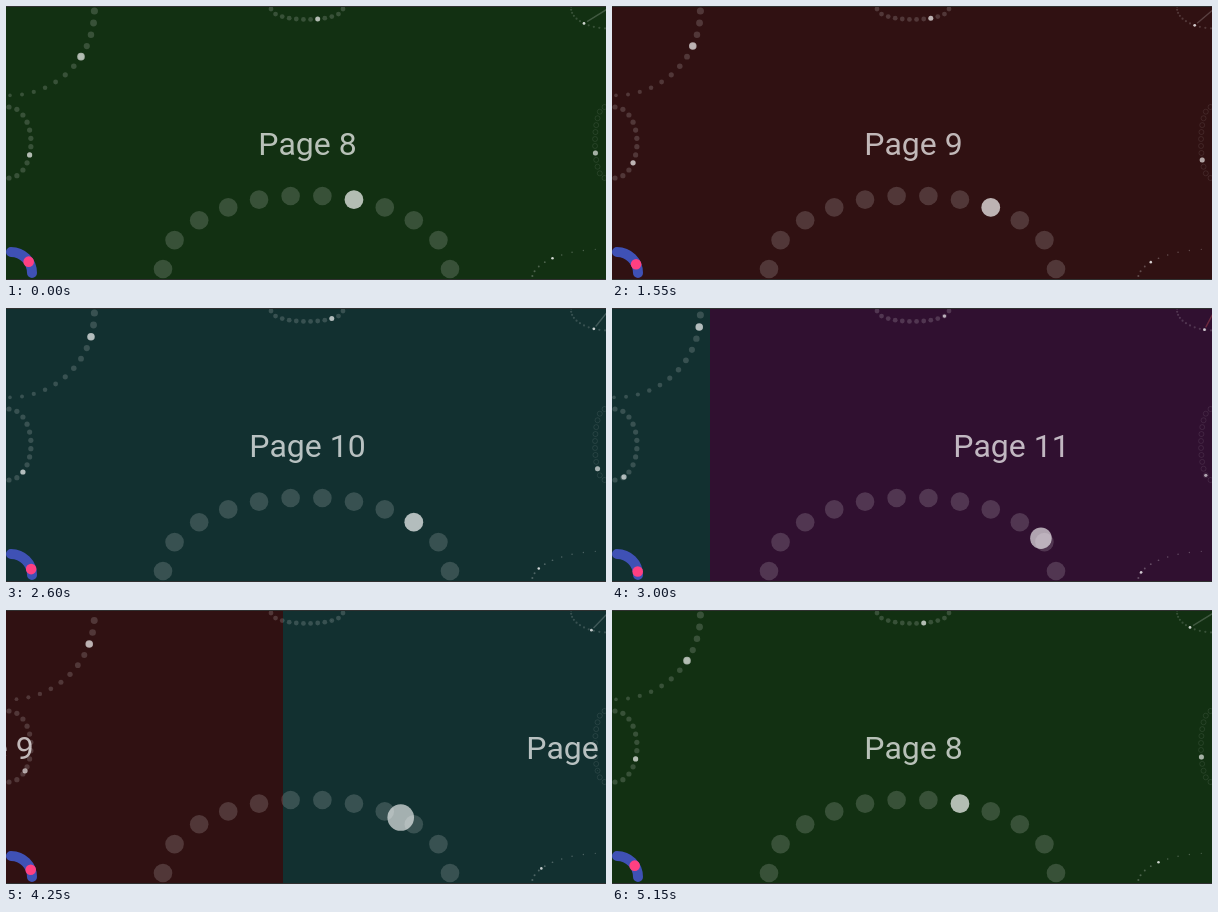
Recreate the animation shown at these times as an HTML page with a canvas. Size 600 px wide and 274 px high, loop 5.95 s.

```html
<!DOCTYPE html>
<html lang="en">
<head>
<meta charset="utf-8">
<title>Pager indicators</title>
<style>
  html, body { margin: 0; width: 100%; height: 100%; overflow: hidden; background: #303030; }
  canvas { display: block; }
</style>
</head>
<body>
<canvas id="stage" width="600" height="274"></canvas>
<script>
const ctx = document.getElementById('stage').getContext('2d');
const W = 600, H = 274, LOOP = 5950, STEP = 50, FIRST_PAGE = 8, DOTS = 12;
const PAGE_COLORS = ['#123012', '#301112', '#123030', '#301030'];
const DIM = 'rgba(255,255,255,.16)', BRIGHT = 'rgba(255,255,255,.62)';
const rad = degrees => degrees * Math.PI / 180;

// Each swipe: start time, direction, time constant, steepness.
const SWIPES = [
  [800, 1, 300, 2.3], [1750, 1, 387, 2.65], [2700, 1, 220, 1.92],
  [3600, -1, 238, 2], [4100, -1, 190.5, 2], [4600, -1, 190, 2]
];

function scrollAt(time) {
  let pages = 0;
  for (const [start, direction, tau, power] of SWIPES) {
    if (time > start) pages += direction * (1 - Math.exp(-(((time - start) / tau) ** power)));
  }
  return Math.round(pages * W) / W;
}

// Elliptic path addressed by dot index, in equal angles.
function byAngle(cx, cy, rx, ry, first, step) {
  return i => {
    const a = rad(first + step * i);
    return [cx + rx * Math.cos(a), cy + ry * Math.sin(a)];
  };
}

// Elliptic path addressed by dot index, in equal arc lengths.
function byLength(cx, cy, rx, ry, from, to) {
  const N = 400, at = byAngle(cx, cy, rx, ry, from, (to - from) / N);
  const lengths = [0];
  for (let k = 1; k <= N; k++) {
    const [x0, y0] = at(k - 1), [x1, y1] = at(k);
    lengths.push(lengths[k - 1] + Math.hypot(x1 - x0, y1 - y0));
  }
  return i => {
    const goal = lengths[N] * i / (DOTS - 1);
    let k = 1;
    while (k < N && lengths[k] < goal) k++;
    return at(k - 1 + (goal - lengths[k - 1]) / (lengths[k] - lengths[k - 1]));
  };
}

const paths = {
  big: byLength(300.5, 263, 143.5, 73.5, 180, 360),
  left: byLength(3, 136.5, 22, 35.5, -90, 90),
  top: byLength(301, 3, 36, 10.5, 180, 0),
  right: byLength(598.5, 136.5, 9.5, 35.5, 270, 90),
  corner: byAngle(4, 5, 84.4, 84.4, 90, -90 / 11),
  track: byAngle(5, 267, 21, 21, 270, 90 / 11),
  dial: byAngle(603, 2, 38, 20.5, 192.7, -8.8),
  tiny: byAngle(600, 273, 74, 30, 290.2, -9.5)
};

function dot([x, y], r, color, outlined) {
  ctx.beginPath();
  ctx.arc(x, y, Math.max(r, 0), 0, 2 * Math.PI);
  if (outlined) {
    ctx.strokeStyle = color;
    ctx.lineWidth = 0.7;
    ctx.stroke();
  } else {
    ctx.fillStyle = color;
    ctx.fill();
  }
}

function dots(path, radius, color = DIM, outlined = false, shift = 0) {
  for (let i = 0; i < DOTS; i++) {
    const at = i + shift;
    dot(path(at), typeof radius === 'function' ? radius(at) : radius, color, outlined);
  }
}

function line([x0, y0], [x1, y1], color, width) {
  ctx.strokeStyle = color;
  ctx.lineWidth = width;
  ctx.beginPath();
  ctx.moveTo(x0, y0);
  ctx.lineTo(x1, y1);
  ctx.stroke();
}

function drawPages(scroll) {
  ctx.font = '32px Roboto, sans-serif';
  ctx.textAlign = 'center';
  PAGE_COLORS.forEach((color, i) => {
    const x = Math.round((i - scroll) * W);
    if (Math.abs(x) >= W) return;
    ctx.fillStyle = color;
    ctx.fillRect(x, 1, W, H - 2);
    ctx.fillStyle = 'rgba(255,255,255,.7)';
    ctx.fillText('Page ' + (FIRST_PAGE + i), x + 301.5, 149);
  });
}

function drawIndicators(scroll) {
  const index = FIRST_PAGE - 1 + scroll;
  const part = index - Math.floor(index);
  const middle = 1 - Math.abs(2 * part - 1);
  const nearest = Math.round(index);

  dots(paths.big, 9.3);
  dot(paths.big(index), 9.4 * (1 + 0.45 * middle), BRIGHT);

  dots(paths.left, 2.6);
  dot(paths.left(index), 2.6, BRIGHT);

  // The whole row travels along with the selected dot.
  dots(paths.corner, at => 1.8 + 0.16 * at, DIM, false, part ? part - 1 : 0);
  dot(paths.corner(index), 3.8, BRIGHT);

  // The selected dot shrinks away and returns on the next place.
  dots(paths.top, 2.4);
  dot(paths.top(nearest), 2.5 * (1 - middle), BRIGHT);
  dots(paths.right, 2.5, 'rgba(255,255,255,.12)', true);
  dot(paths.right(nearest), 2.5 * (1 - middle), BRIGHT);

  dots(paths.dial, 1.1);
  const tip = paths.dial(index), hub = [603, 2];
  const handStart = tip.map((v, k) => v + (hub[k] - v) * 0.12);
  line(handStart, hub, scroll > 2 ? 'rgba(220,90,90,.35)' : 'rgba(255,255,255,.2)', 1.4);
  dot(tip, 1.4, 'rgba(255,255,255,.75)');

  dots(paths.tiny, at => 0.5 + 0.05 * at, 'rgba(255,255,255,.25)');
  dot(paths.tiny(index), 1.3, 'rgba(255,255,255,.75)');

  ctx.strokeStyle = '#3f51b5';
  ctx.lineWidth = 10;
  ctx.lineCap = 'round';
  ctx.beginPath();
  ctx.arc(5, 267, 21, rad(270), rad(360));
  ctx.stroke();
  ctx.lineCap = 'butt';
  dot(paths.track(index), 5.3, '#ff4081');
}

function draw(time) {
  const scroll = scrollAt(Math.floor((time % LOOP) / STEP) * STEP);
  drawPages(scroll);
  drawIndicators(scroll);
  ctx.fillStyle = '#303030';
  ctx.fillRect(0, 0, W, 1);
  ctx.fillRect(0, H - 1, W, 1);
}

const begin = performance.now();
function tick() {
  draw(performance.now() - begin);
  requestAnimationFrame(tick);
}
tick();
</script>
</body>
</html>
```
